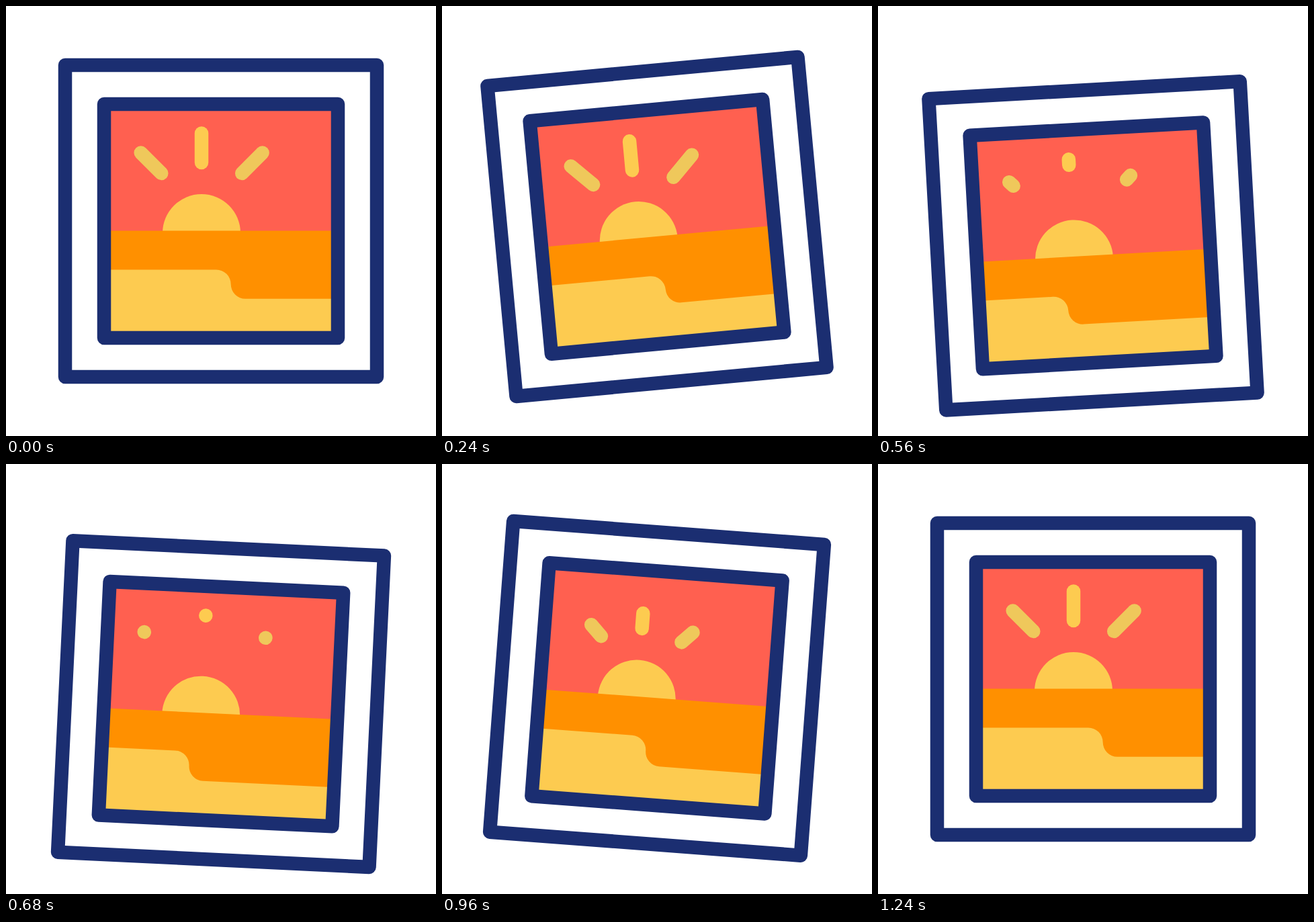
An HTML page for the animation above (1280 ms loop, 640 px wide and 640 px high).

```html
<!DOCTYPE html>
<html lang="en">
<head>
<meta charset="utf-8">
<title>Swinging picture</title>
<style>
  html, body { margin: 0; width: 100%; height: 100%; overflow: hidden; background: #fff; }
  svg { display: block; width: 100%; height: 100%; }

  .picture, .shore, .ray {
    animation: 1280ms cubic-bezier(.56, 0, .44, 1) infinite;
  }
  .picture {
    transform-origin: 320px 320px;
    animation-name: swing, drop;
  }
  .shore { animation-name: tide; }
  .ray { animation-name: shine; stroke-dasharray: 1 3; }

  .border { fill: none; stroke: #1b2e71; stroke-width: 20.5; stroke-linejoin: round; }
  .rays { fill: none; stroke: #efc85b; stroke-width: 20.5; stroke-linecap: round; }

  @keyframes swing {
    0%, 3.125% { rotate: 0deg; }
    28.125% { rotate: -7deg; }
    65.94% { rotate: 5deg; }
    96.875%, 100% { rotate: 0deg; }
  }
  @keyframes drop {
    0% { translate: 0 0; }
    3.125% { translate: 0 0; animation-timing-function: cubic-bezier(.52, 0, .39, 1); }
    50% { translate: 0 37.5px; animation-timing-function: cubic-bezier(.4, 0, .495, 1); }
    96.875%, 100% { translate: 0 0; }
  }
  @keyframes tide {
    0%, 3.125% { translate: 0 0; }
    50% { translate: -58px 0; }
    96.875%, 100% { translate: 0 0; }
  }
  /* Each ray shrinks to its outer tip, then regrows from its inner end. */
  @keyframes shine {
    0%, 23.05% { stroke-dasharray: 1 3; stroke-dashoffset: 0; }
    54.69% { stroke-dasharray: .002 3; stroke-dashoffset: 0; animation-timing-function: step-end; }
    56.25%, 59.375% { stroke-dasharray: .002 3; stroke-dashoffset: -.998; }
    90.23%, 100% { stroke-dasharray: 1 3; stroke-dashoffset: 0; }
  }
</style>
</head>
<body>
<svg viewBox="0 0 640 640">
  <clipPath id="view"><rect x="146" y="146" width="348" height="348"/></clipPath>
  <g class="picture">
    <g clip-path="url(#view)">
      <rect x="146" y="146" width="348" height="348" fill="#ff6050"/>
      <circle cx="291" cy="338" r="58" fill="#fdcb50"/>
      <rect x="146" y="334.5" width="348" height="160" fill="#ff9000"/>
      <path class="shore" fill="#fdcb50"
        d="M100 392.5H313a21.7 21.7 0 0 1 21.7 21.7a21.6 21.6 0 0 0 21.6 21.6H600V520H100Z"/>
    </g>
    <g class="rays">
      <path class="ray" pathLength="1" d="M200.7 218.5L231.3 249"/>
      <path class="ray" pathLength="1" d="M291 189.6V233" stroke="#fdcb50"/>
      <path class="ray" pathLength="1" d="M381.6 218.5L351.2 249"/>
    </g>
    <g class="border">
      <rect x="88" y="88" width="464" height="464"/>
      <rect x="146" y="146" width="348" height="348"/>
    </g>
  </g>
</svg>
</body>
</html>
```
